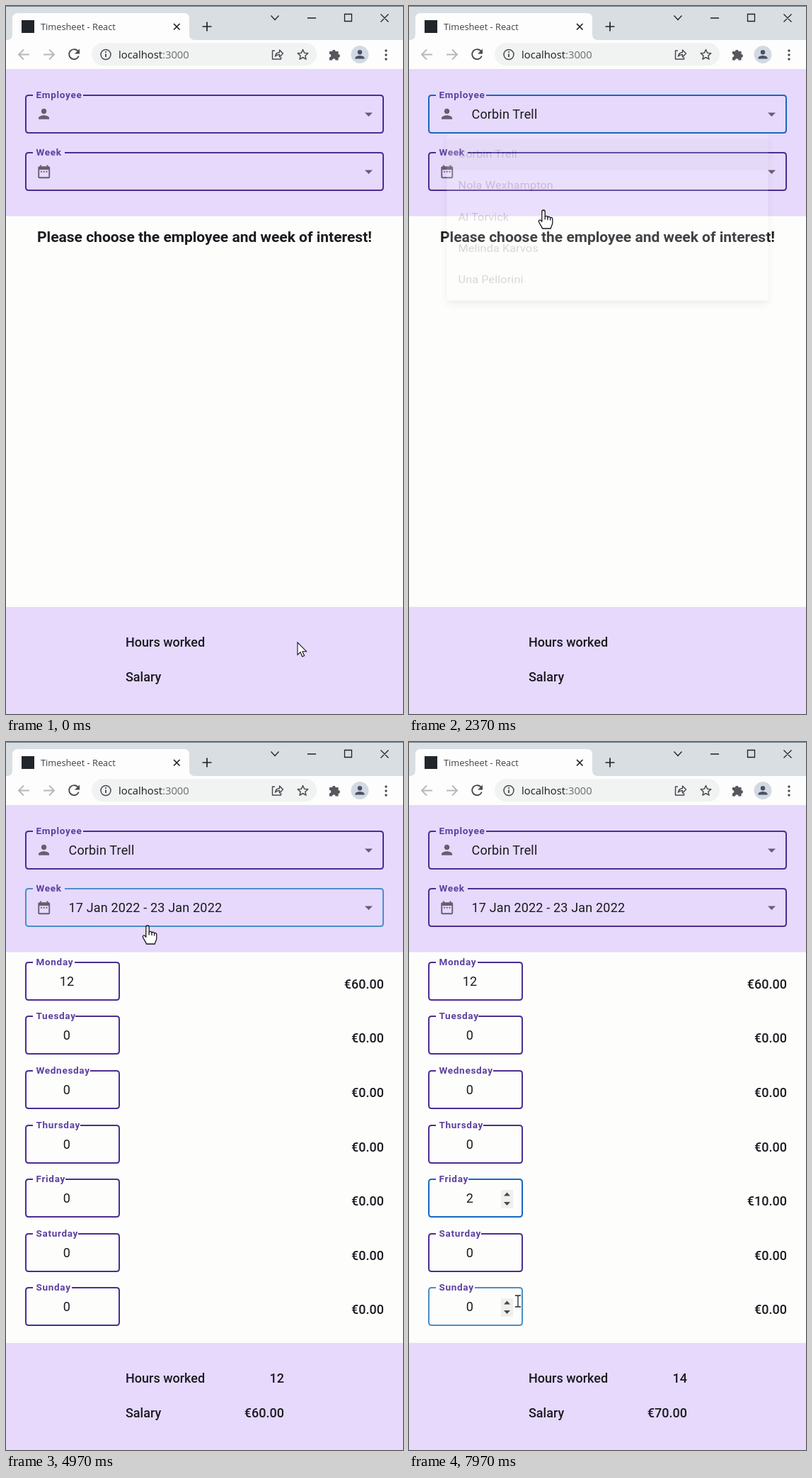
An HTML page that plays this animation: 561 by 999 pixels, repeating every 8000 ms.

```html
<!DOCTYPE html>
<html lang="en">
<head>
<meta charset="utf-8">
<title>Timesheet</title>
<style>
html, body { margin: 0; width: 100%; height: 100%; overflow: hidden; background: #fdfdfc; }
svg { position: absolute; left: 0; top: 0; width: 561px; height: 999px; }
text { font-family: Roboto, sans-serif; font-size: 18px; fill: #1b1a1f; }
.ui { font-family: "Open Sans", sans-serif; }
.label { font-size: 13.5px; font-weight: 700; letter-spacing: .7px; fill: #5c3fa0; }
.medium { font-weight: 500; }
.value, .menu { letter-spacing: .00938em; }
.prompt { font-size: 21px; font-weight: 700; }
.line { fill: none; stroke: #202124; stroke-width: 1.3; }
.thick { fill: none; stroke: #4a4d51; stroke-width: 1.9; }
.menu {
  position: absolute; left: 27px; width: 507px; padding: 9px 0; box-sizing: border-box;
  font: 18px/54px Roboto, sans-serif; letter-spacing: .00938em; color: #2a292d;
  background: #fdfdfc; border-radius: 4.5px; transform-origin: 50% 0;
  box-shadow: 0 5.6px 5.6px -3.4px rgba(0,0,0,.2), 0 9px 11px 1px rgba(0,0,0,.14), 0 3.4px 16px 2px rgba(0,0,0,.12);
}
.menu div { padding-left: 18px; height: 54px; }
.menu div:first-child { background: #dcdcdb; }
</style>
</head>
<body>
<svg viewBox="0 0 561 999">
  <rect width="561" height="48" fill="#d8dee2"/>
  <rect width="561" height="1" fill="#6f7d86"/>
  <path d="M0 48h1q8 0 8-8V18q0-8 8-8H251q8 0 8 8V40q0 8 8 8H561V88.5H0z" fill="#fdfdfd"/>
  <rect x="22" y="20" width="18" height="18" fill="#20262c"/>
  <text class="ui" x="49" y="33.5" style="font-size:12.8px;fill:#3f4246">Timesheet - React</text>
  <g class="line">
    <path d="M374.5 13.5l5.5 6 5.5-6M426 17h12M478.5 11.5h10v10h-10zM529.5 11.5l11 11m0-11l-11 11"/>
    <path d="M237 25l8.500 8.500m0-8.500l-8.500 8.500M277.5 29h13M284 22.5v13" stroke-width="1.7"/>
  </g>
  <path class="thick" d="M33 68.5H18m7-7l-7 7 7 7M53 68.5h15m-7-7l7 7-7 7" style="stroke:#b6b8bb"/>
  <path class="thick" d="M102.5 65a7 7 0 1 0 .3 5.5"/>
  <path d="M104 60.5v7h-7z" fill="#4a4d51"/>
  <rect x="121" y="52" width="318" height="32" rx="16" fill="#f0f3f2"/>
  <circle class="thick" cx="141" cy="68.5" r="7" style="stroke-width:1.5"/>
  <path class="thick" d="M141 67.5v4.5M141 64v1.8"/>
  <text class="ui" x="159" y="73.5" style="font-size:14.8px">localhost<tspan fill="#6a6d70">:3000</tspan></text>
  <g class="thick" style="stroke-width:1.5;stroke-linejoin:round">
    <path d="M380 63h-3.5v12h12v-3M380.5 71c.5-4 3-5.5 6-5.5v-3.5l5 5-5 5v-3.5c-2.5 0-4.5.5-6 2.5z"/>
    <path d="M419.5 61.5l2.1 4.7 5.2.5-3.9 3.4 1.1 5.1-4.5-2.7-4.5 2.7 1.1-5.1-3.9-3.4 5.2-.5z"/>
  </g>
  <path d="M457 64h4a2.3 2.3 0 1 1 4.6 0h4v4a2.4 2.4 0 1 1 0 4.8v3.7h-4a2.3 2.3 0 0 0-4.6 0h-4v-4.2a2.3 2.3 0 0 0 0-4.6z" fill="#55585c"/>
  <circle cx="500" cy="68.5" r="12.5" fill="#d3d9e2"/>
  <path d="M500 68.5a3.2 3.2 0 1 0 0-6.4 3.2 3.2 0 0 0 0 6.4M493.5 74.5v-1.3c0-2.3 4.3-3.3 6.5-3.3s6.5 1 6.5 3.3v1.3z" fill="#4b5261"/>
  <g fill="#4a4d51"><circle cx="537" cy="63" r="1.7"/><circle cx="537" cy="69" r="1.7"/><circle cx="537" cy="75" r="1.7"/></g>
  <path d="M0 89H561V296.5H0zM0 848H561V999H0z" fill="#e6d9fc"/>
  <g fill="#655f70">
    <path transform="translate(42.3 141) scale(.9375)" d="M12 12c2.21 0 4-1.79 4-4s-1.79-4-4-4-4 1.79-4 4 1.79 4 4 4zm0 2c-2.67 0-8 1.34-8 4v2h16v-2c0-2.66-5.33-4-8-4z"/>
    <path transform="translate(42.5 222.5) scale(.9375)" d="M9 11H7v2h2zm4 0h-2v2h2zm4 0h-2v2h2zm2-7h-1V2h-2v2H8V2H6v2H5c-1.1 0-2 .9-2 2v14c0 1.1.9 2 2 2h14c1.1 0 2-.9 2-2V6c0-1.1-.9-2-2-2zm0 16H5V9h14z"/>
  </g>
  <text class="medium" x="169" y="904">Hours worked</text>
  <text class="medium" x="169" y="953">Salary</text>
</svg>
<svg id="form" viewBox="0 0 561 999"></svg>
<div class="menu" id="employees"></div>
<div class="menu" id="weeks"></div>
<svg id="pointer" viewBox="0 0 561 999"></svg>

<script>
const LOOP = 8000, GROW = 308;
const PURPLE = '#4c2d92', FOCUS = '#1769bf', HOVER = '#4a8fc7';
const $ = id => document.getElementById(id);

const employees = ['Corbin Trell', 'Nola Wexhampton', 'Al Torvick', 'Melinda Karvos', 'Una Pellorini'];
const weeks = ['17 Jan 2022 - 23 Jan 2022', '10 Jan 2022 - 16 Jan 2022', '03 Jan 2022 - 09 Jan 2022',
  '27 Dec 2021 - 02 Jan 2022', '20 Dec 2021 - 26 Dec 2021'];
const menus = [
  { el: $('employees'), items: employees, open: 1425, close: 2203, top: 180 },
  { el: $('weeks'), items: weeks, open: 3000, close: 4300, top: 261 },
];
for (const { el, items, top } of menus) {
  el.style.top = top + 'px';
  el.innerHTML = items.map(s => `<div>${s}</div>`).join('');
}

// Outlined boxes; gap is where the top border resumes after the label.
const selects = [
  { label: 'Employee', gap: 109, y: 126, w: 505 },
  { label: 'Week', gap: 83, y: 207, w: 505 },
];
const days = Object.entries({ Monday: 97, Tuesday: 98, Wednesday: 119, Thursday: 105, Friday: 84, Saturday: 102, Sunday: 93 })
  .map(([label, gap], i) => ({ label, gap, y: Math.round(310.7 + 76.6 * i), w: 132 }));
const friday = days[4];
const clicks = [7000, 7300];

// Pointer stops: time, x, y.
const path = [
  [0, 412, 898], [120, 412, 898], [1250, 166, 156], [1425, 160, 160], [1670, 146, 214], [2150, 151, 217],
  [2370, 190, 288], [2780, 180, 238], [3020, 174, 238], [3370, 160, 310], [4300, 168, 302], [4970, 200, 259],
  [5350, 199, 260], [6650, 142, 639], [7420, 142, 639], [7970, 154, 789], [8000, 154, 789],
];

function pointerAt(t) {
  const i = path.findIndex(p => p[0] > t);
  const [t0, x0, y0] = path[i - 1], [t1, x1, y1] = path[i];
  const u = (t - t0) / (t1 - t0), k = u * u * (3 - 2 * u);
  return { x: x0 + (x1 - x0) * k, y: y0 + (y1 - y0) * k };
}

// cubic-bezier(.4, 0, .2, 1)
function ease(x) {
  if (x <= 0 || x >= 1) return x <= 0 ? 0 : 1;
  let lo = 0, hi = 1, s;
  for (let i = 0; i < 20; i++) {
    s = (lo + hi) / 2;
    if (1.2 * s * (1 - s) ** 2 + .6 * s * s * (1 - s) + s ** 3 < x) lo = s; else hi = s;
  }
  return s * s * (3 - 2 * s);
}

function drawMenu({ el, open, close }, t) {
  const closing = t >= close;
  const age = t - (closing ? close : open);
  const fade = ease(age / GROW);
  const grow = ease((closing ? age - GROW / 3 : age) / (GROW * 2 / 3));
  const size = closing ? 1 - grow : grow;
  el.style.opacity = closing ? 1 - fade : fade;
  el.style.transform = `scale(${.75 + .25 * size}, ${.5625 + .4375 * size})`;
}

const inside = (p, f) => p.x >= 27 && p.x <= 29 + f.w && p.y >= f.y - 1 && p.y <= f.y + 54;
const euro = n => '€' + n.toFixed(2);
const text = (x, y, s, cls, anchor = 'start') => `<text x="${x}" y="${y}" class="${cls}" text-anchor="${anchor}">${s}</text>`;

function box({ label, gap, y, w }, color) {
  return `<path fill="none" stroke="${color}" stroke-width="2"
    d="M${gap} ${y}H${24 + w}q4 0 4 4v45q0 4-4 4H32q-4 0-4-4V${y + 4}q0-4 4-4h6"/>` + text(42.5, y + 4, label, 'label');
}

function spinner(y, p) {
  const half = p && p.x >= 130 && p.x <= 147 ? (p.y < y + 28 ? 15 : 28) : 0;
  return `<rect x="130" y="${y + 15}" width="17" height="26" fill="#efefee"/>` +
    (half ? `<rect x="130" y="${y + half}" width="17" height="13" fill="#cfcfcf"/>` : '') +
    `<path d="M134 ${y + 23.5}l4.5-5 4.5 5zM134 ${y + 32}l4.5 5 4.5-5z" fill="#48484a"/>`;
}

const shapes = {
  arrow: '<path d="M0 0V17.5l4-3.8 2.7 6.3 2.9-1.2-2.7-6.1h5.6z" fill="#fff" stroke="#111" stroke-width="1.1"/>',
  hand: `<g fill="#fff" stroke="#16161c" stroke-width="1.3" stroke-linejoin="round">
    <path d="M-2.2 2.2a2.2 2.2 0 0 1 4.4 0V9.5a2 2 0 0 1 3.8.6 2 2 0 0 1 3.6.8 1.9 1.9 0 0 1 3.2 1.4V18c0 3-2 4.5-2.5 8H-1.5C-2.5 23-5 20-6.5 16.5c-1-2 1.5-3.5 3-1.8l1.3 1.6z"/>
    <path d="M2.2 9.5v4M6 10v4M9.6 11v3.5"/></g>`,
  beam: '<path d="M-4-8h3q1 0 1 1V7q0 1-1 1h-3M4-8H1q-1 0-1 1V7q0 1 1 1h3" fill="none" stroke="#222" stroke-width="1.3"/>',
};

function draw(t) {
  const p = pointerAt(t);
  const menu = menus.find(m => t >= m.open && t < m.close + GROW);
  const ready = t >= menus[1].close;
  const hovered = menu ? null : [...selects, ...(ready ? days : [])].find(f => inside(p, f));
  const focused = t >= clicks[0] ? friday : t >= menus[1].open ? selects[1] : t >= menus[0].open ? selects[0] : null;
  const color = f => f === hovered ? HOVER : f === focused ? FOCUS : PURPLE;

  let out = '';
  selects.forEach((f, i) => {
    const m = menus[i], isOpen = t >= m.open && t < m.close;
    out += box(f, color(f)) + `<path fill="#655f70" d="M507 ${f.y + (isOpen ? 29 : 24.5)}h11l-5.5 ${isOpen ? -5.5 : 5.5}z"/>`;
    if (t >= m.close) out += text(88.5, f.y + 33, m.items[0], 'value');
  });

  if (ready) {
    const extra = clicks.filter(c => t >= c).length;
    days.forEach((f, i) => {
      const hours = i === 0 ? 12 : f === friday ? extra : 0;
      out += box(f, color(f)) + text(86, f.y + 33, hours, 'value', 'middle') +
        text(534, f.y + 36.5, euro(hours * 5), 'medium', 'end');
      if (f === hovered || f === focused) out += spinner(f.y, f === hovered && p);
    });
    out += text(393, 904, 12 + extra, 'medium', 'end') + text(393, 953, euro((12 + extra) * 5), 'medium', 'end');
  } else {
    out += text(280.5, 333, 'Please choose the employee and week of interest!', 'prompt', 'middle');
  }
  $('form').innerHTML = out;
  menus.forEach(m => drawMenu(m, t));

  const overMenu = menu && p.x > 27 && p.x < 534 && p.y > menu.top && p.y < menu.top + 288;
  const overSpinner = p.x >= 130 && p.x <= 147 && hovered && p.y > hovered.y + 15 && p.y < hovered.y + 41;
  const kind = overMenu || selects.includes(hovered) ? 'hand' : hovered && !overSpinner ? 'beam' : 'arrow';
  $('pointer').innerHTML = `<g transform="translate(${p.x} ${p.y})">${shapes[kind]}</g>`;
}

function tick() {
  draw(performance.now() % LOOP);
  requestAnimationFrame(tick);
}
tick();
</script>
</body>
</html>
```
